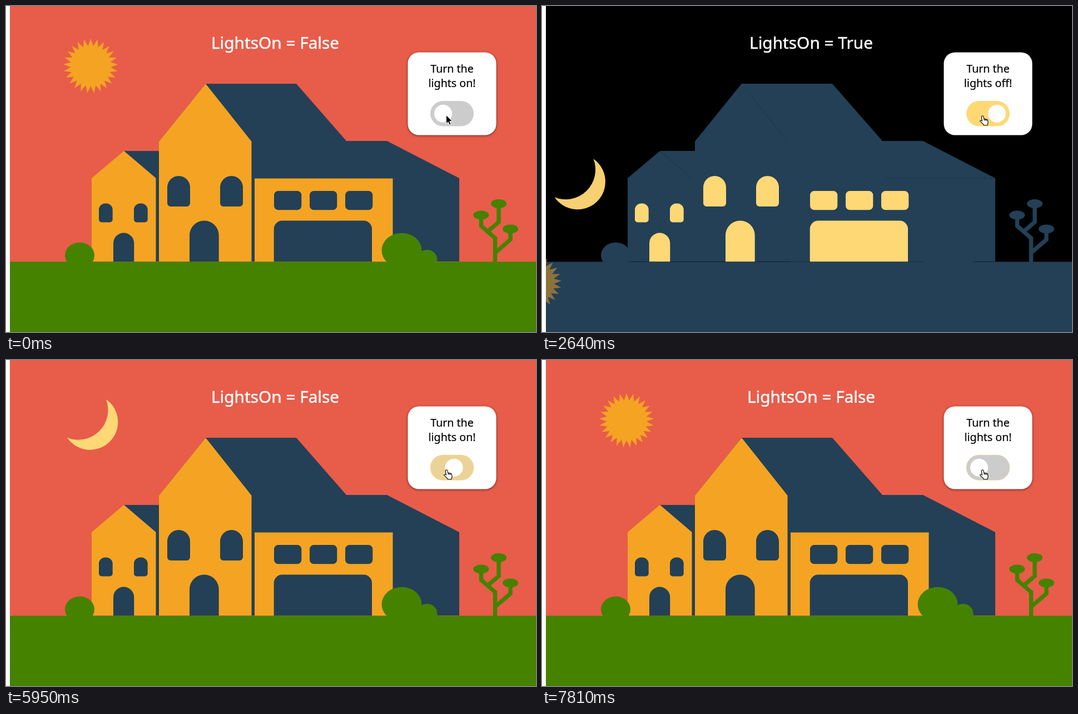
Recreate the animation shown at these times as an HTML page. Size 953 px wide and 587 px high, loop 8 s.

```html
<!DOCTYPE html>
<html lang="en">
<head>
<meta charset="utf-8">
<title>Lights toggle</title>
<style>
  html, body { margin: 0; width: 100%; height: 100%; overflow: hidden; background: #fff; }
  svg { display: block; width: 953px; height: 587px; }
  text { font-family: "Noto Sans", "Open Sans", sans-serif; text-anchor: middle; }
  .title { font-size: 29.8px; fill: #fff; stroke: #fff; stroke-width: .5px; }
  .label { font-size: 19.6px; fill: #000; stroke: #000; stroke-width: .2px; }
  .card { fill: #fff; filter: drop-shadow(0 1px 2px rgba(0, 0, 0, .55)); }

  .sky { fill: #e85c4a; }
  .navy { fill: #234056; }
  .wall, .sun { fill: #f4a422; }
  .moon { fill: #ffd876; }
  .green { fill: #458200; }
  .branch { fill: none; stroke: #458200; stroke-width: 7.4; }
  .window { fill: #234056; }
  .seam { fill: none; stroke: #1a3145; stroke-width: .8; visibility: hidden; }

  .night .sky { fill: #000; }
  .night .wall, .night .green { fill: #234056; }
  .night .branch { stroke: #234056; }
  .night .window { fill: #ffd876; }
  .night .seam { visibility: visible; }
</style>
</head>
<body>
<svg id="stage" viewBox="0 0 953 587">
  <clipPath id="frame"><rect x="7" width="946" height="587"/></clipPath>
  <g clip-path="url(#frame)">
    <rect class="sky" x="7" width="946" height="587"/>

    <path class="navy" d="M212 261H275V460H269V310Z"/>
    <path class="navy" d="M359 140H522L612 243H685L815 310V460H275V244Z"/>
    <path class="wall" d="M154 310L212 261L269.5 310V460H154Z"/>
    <path class="wall" d="M275 244L359 140L441.500 244V460H275Z"/>
    <rect class="wall" x="447" y="310.500" width="248.500" height="150"/>
    <path class="seam" d="M374 159L441 243M216 264L269 310M618 310.200H814"/>
    <g id="windows"></g>

    <rect class="green" x="7" y="460.500" width="946" height="127"/>
    <ellipse class="green" cx="132.500" cy="449" rx="26.500" ry="23.300"/>
    <ellipse class="green" cx="711.500" cy="440" rx="36" ry="31.300"/>
    <ellipse class="green" cx="757" cy="456.500" rx="18.500" ry="17.500"/>
    <path class="branch" d="M879.500 462V418L854.500 396V377M866 406L886 389V357M880 444L907 420.500V402"/>
    <ellipse class="green" cx="886" cy="356" rx="14" ry="8"/>
    <ellipse class="green" cx="854.300" cy="376.500" rx="14" ry="8"/>
    <ellipse class="green" cx="907" cy="401.500" rx="14" ry="8"/>

    <path class="sun" id="sun"/>
    <path class="moon" id="moon" d="M181 68A50 50 0 1 1 111 137A53.500 53.500 0 0 0 181 68Z"/>
  </g>

  <text class="title" id="title" x="484" y="77"></text>

  <rect class="card" x="722.500" y="83.500" width="159" height="149" rx="20"/>
  <text class="label" x="802" y="120">Turn the</text>
  <text class="label" id="label" x="802" y="146"></text>
  <rect id="track" x="763" y="171" width="78" height="45.500" rx="22.750" stroke-width=".8"/>
  <circle id="knob" cy="193.800" r="16" fill="#fff"/>

  <path id="arrow" transform="translate(791.500 196.500)" fill="#000" stroke="#fff" stroke-width="1"
    d="M0 0V15.500L3.500 12.200L6 17.600L8.600 16.500L6.200 11.200H11Z"/>
  <g id="hand" transform="translate(787 197)" stroke="#000" stroke-width="1.100" stroke-linejoin="round">
    <path fill="#fff" d="M4.200 1.200c1.300-.7 2.400 0 2.700 1.200l1 4.400c.6-.8 1.800-.7 2.200.2c.7-.6 1.800-.4 2.100.5c.9-.5 1.900.1 2.100 1.100l.7 3.300c.2 1.600-.2 2.600-.7 4l-.2 1.900h-7l-.4-1.600C5 14.500 3 12.500.9 10.900c-.9-1 .3-2.200 1.600-1.800l2 1L3.200 3.200C3 2.300 3.400 1.600 4.200 1.200z"/>
    <path fill="none" d="M7.900 6.800l.6 2.700M10.100 7l.6 2.500M12.200 7.500l.5 2.200"/>
  </g>
</svg>
<script>
const LOOP = 8000, ON_AT = 1470, OFF_AT = 5950, HAND_AT = 1210;
const ON_START = 1460, OFF_START = 5855;   // clicks land just before they show
const SLIDE = 400, TRAVEL = 2000;
const PATH = { x: -255, y: 597 };
const $ = id => document.getElementById(id);
const mix = (a, b, k) => a + (b - a) * k;

function bezier(x1, y1, x2, y2) {
  const at = (a, b, s) => 3 * (1 - s) * (1 - s) * s * a + 3 * (1 - s) * s * s * b + s * s * s;
  return x => {
    if (x <= 0) return 0;
    if (x >= 1) return 1;
    let lo = 0, hi = 1;
    for (let i = 0; i < 24; i++) {
      const mid = (lo + hi) / 2;
      if (at(x1, x2, mid) < x) lo = mid; else hi = mid;
    }
    return at(y1, y2, lo);
  };
}
const ease = bezier(.25, .1, .25, 1);
const easeInOut = bezier(.42, 0, .58, 1);

// Window with top corner radius r and bottom corner radius b
function pane(x, y, w, h, r, b) {
  const corner = (q, dx, dy) => `a${q} ${q} 0 0 1 ${dx * q} ${dy * q}`;
  return `<path class="window" d="M${x} ${y + r}${corner(r, 1, -1)}H${x + w - r}${corner(r, 1, 1)}` +
    `V${y + h - b}${corner(b, -1, 1)}H${x + b}${corner(b, -1, -1)}Z"/>`;
}
$('windows').innerHTML = [
  ...[167, 230].map(x => pane(x, 355.5, 24.7, 34, 11.5, 5)),
  ...[290, 385].map(x => pane(x, 306, 41, 55, 20.5, 6)),
  ...[482, 546, 610].map(x => pane(x, 333, 49.3, 34.2, 7.5, 7.5)),
  pane(193, 408.5, 37.3, 52, 18.6, 0),
  pane(330, 386.5, 52.7, 74, 26.3, 0),
  pane(481.7, 386.5, 176.3, 74, 15, 0)
].join('');

function star(cx, cy, n, outer, inner) {
  const pts = [];
  for (let i = 0; i < 2 * n; i++) {
    const a = i * Math.PI / n, r = i % 2 ? inner : outer;
    pts.push((cx + r * Math.sin(a)).toFixed(2) + ' ' + (cy - r * Math.cos(a)).toFixed(2));
  }
  return 'M' + pts.join('L') + 'Z';
}
$('sun').setAttribute('d', star(152.3, 108, 25, 49.3, 36));

// away: 0 in the sky, 1 below the horizon
function place(id, away, minOpacity) {
  $(id).setAttribute('transform', `translate(${PATH.x * away} ${PATH.y * away})`);
  $(id).setAttribute('opacity', mix(1, minOpacity, away));
}

function draw(t) {
  const on = t >= ON_AT && t < OFF_AT;
  const since = t < ON_AT ? LOOP : t - (on ? ON_START : OFF_START);
  const slide = ease(since / SLIDE), travel = easeInOut(since / TRAVEL);
  const lit = on ? slide : 1 - slide;
  const night = on ? travel : 1 - travel;

  $('stage').setAttribute('class', on ? 'night' : 'day');
  $('title').textContent = 'LightsOn = ' + (on ? 'True' : 'False');
  $('label').textContent = on ? 'lights off!' : 'lights on!';
  place('sun', night, .25);
  place('moon', 1 - night, .9);

  const rgb = [[204, 255], [204, 216], [204, 118]].map(([a, b]) => Math.round(mix(a, b, lit)));
  $('track').setAttribute('fill', `rgb(${rgb})`);
  $('track').setAttribute('stroke', t >= OFF_AT ? 'rgba(255,216,118,.6)' : 'none');
  $('knob').setAttribute('cx', mix(786, 818, lit));

  const hand = t >= HAND_AT;
  $('arrow').setAttribute('visibility', hand ? 'hidden' : 'visible');
  $('hand').setAttribute('visibility', hand ? 'visible' : 'hidden');
}

const start = performance.now();
function tick() {
  draw((performance.now() - start) % LOOP);
  requestAnimationFrame(tick);
}
tick();
</script>
</body>
</html>
```
